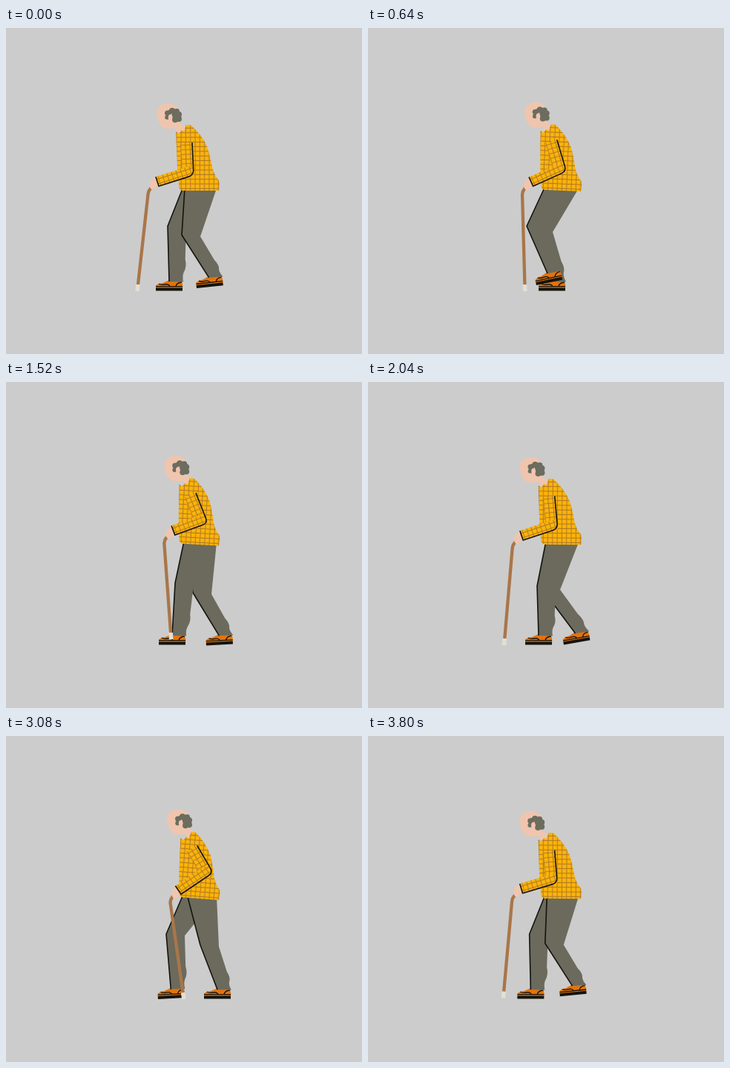
Recreate the animation shown at these times as an HTML page. Size 480 px wide and 441 px high, loop 3.84 s.

```html
<!DOCTYPE html>
<html lang="en">
<head>
<meta charset="utf-8">
<title>Walking with a cane</title>
<style>
  html, body { margin: 0; width: 100%; height: 100%; overflow: hidden; background: #ccc; }
  svg { display: block; }
  .line { fill: none; stroke: #14140f; stroke-width: 1.6; stroke-linejoin: round; }
  .skin { fill: #f0c5ae; }
  .hair { fill: #6c6c5f; }
  .trousers { fill: #6b6a5d; }
  .plaid { fill: url(#plaid); }
</style>
</head>
<body>
<svg width="480" height="441" viewBox="0 0 480 441">
  <defs>
    <pattern id="plaid" width="6.3" height="6.3" patternUnits="userSpaceOnUse">
      <rect width="6.3" height="6.3" fill="#fbb40a"/>
      <path d="M0 3H6.3M3 0V6.3" stroke="#b27a22" stroke-width="1"/>
    </pattern>
    <g id="shoe">
      <path fill="#e2730f" d="M0-3V-7Q2-10 9-10.5L17-14H34Q37-9 36-3Z"/>
      <path fill="#14140f" d="M0-4H36V0H0Z"/>
      <path class="line" style="stroke-width:1.3" d="M0-5.8H36M4-9.5Q7-7.5 12-8.5T19-6M27-6Q28-11 35-11.5"/>
    </g>
  </defs>

  <g id="far"><use href="#shoe"/><path class="trousers"/><path class="line"/></g>
  <g id="near"><use href="#shoe"/><path class="trousers"/><path class="line"/></g>

  <g id="head">
    <path class="skin" d="M203.500 116C203 107 210 102 218 102C228 102 234 108 234 118L233 128L241 134L238 142L230 140L228 135C222 137 213 137 210 133C206 128 204 123 203.500 116Z"/>
    <g class="hair">
      <path d="M216 113L223 109L234 113L235 125L226 126L223 115L219 124L215 121Z"/>
      <circle cx="217.500" cy="115" r="3.500"/><circle cx="217" cy="121" r="2.800"/>
      <circle cx="224" cy="112" r="4"/><circle cx="230" cy="113" r="4"/>
      <circle cx="233" cy="117" r="4"/><circle cx="233" cy="123" r="4"/><circle cx="228" cy="124" r="4"/>
    </g>
    <ellipse class="skin" cx="221.500" cy="121" rx="2.700" ry="4"/>
  </g>

  <path id="torso" class="plaid" d="M243 131Q249 130 252 134Q264 145 271 160Q275 172 278 188Q280 198 287 206Q289 210 287 220H238Q232 218 233 211L231 190L229 140L233 143L237 138L240 140Z"/>
  <path id="cane" fill="none" stroke="#a97649" stroke-width="4.300"/>
  <path id="tip" stroke="#e3dfd7" stroke-width="5.500"/>

  <rect id="upperArm" class="plaid" height="16"/>
  <g id="forearm">
    <path class="skin" d="M1-12Q-5-13-9-9Q-13-4-11 1Q-8 4-4 0L1-2Z"/>
    <rect class="plaid" y="-13.500" height="13.500"/>
  </g>
  <path id="armLine" class="line"/>
</svg>
<script>
const LOOP = 3840, STEP = LOOP / 2, FRAME = 40;
const $ = id => document.getElementById(id);
const set = (el, name, value) => el.setAttribute(name, value);

// time, toe x, sole y, foot angle, knee x, knee y
const nearKeys = [
  [0, 257, 352, -6, 237, 280],
  [640, 227, 348, -12, 214, 268],
  [1520, 206, 355.5, 0, 228, 272],
  [1680, 199, 355.5, 0, 224, 271],
  [2040, 212, 355.5, 0, 228, 276],
  [2600, 245, 355.5, 0, 240, 280],
  [3080, 267, 355.5, 0, 262, 283],
  [3400, 275, 355.5, -2, 258, 284],
];
const farKeys = [
  [0, 202, 355.5, 0, 218, 268],
  [640, 230, 355.5, 0, 224, 274],
  [1520, 270, 356.5, -3, 252, 285],
  [2040, 264, 355.5, -10, 234, 279],
  [2600, 231, 350, -20, 211, 262],
  [3080, 205, 356, -3, 216, 268],
  [3560, 199, 355.5, 0, 216, 268],
];

// Looping monotone cubic interpolation through the keys
function pose(keys, t) {
  const n = keys.length;
  const at = i => {
    const turn = Math.floor(i / n), [time, ...values] = keys[i - turn * n];
    return [time + turn * LOOP, ...values];
  };
  const i = keys.findLastIndex(k => k[0] <= t);
  const [a, b, c, d] = [-1, 0, 1, 2].map(k => at(i + k));
  const slope = (p, q, j) => (q[j] - p[j]) / (q[0] - p[0]);
  const tangent = (m, k) => m * k > 0 ? 2 * m * k / (m + k) : 0;
  const h = c[0] - b[0], u = (t - b[0]) / h, v = 1 - u;
  return [1, 2, 3, 4, 5].map(j => {
    const mid = slope(b, c, j);
    const m0 = tangent(slope(a, b, j), mid), m1 = tangent(mid, slope(c, d, j));
    return v * v * (1 + 2 * u) * b[j] + u * u * (3 - 2 * u) * c[j] + h * u * v * (v * m0 - u * m1);
  });
}

function drawLeg(id, keys, t) {
  const [x, y, angle, kx, ky] = pose(keys, t);
  const r = angle * Math.PI / 180;
  const onFoot = (px, py) => [x + px * Math.cos(r) - py * Math.sin(r), y + px * Math.sin(r) + py * Math.cos(r)];
  const ankle = onFoot(18, -12.5), heel = onFoot(37, -12);
  const back = [kx + 25, ky + 2];
  const shin = (u, out) => [back[0] + (heel[0] - back[0]) * u + out, back[1] + (heel[1] - back[1]) * u];
  const front = `M${241 + (kx - 237) * .15} 217L${kx} ${ky}L${ankle}`;
  const [shoe, cloth, line] = $(id).children;
  set(shoe, 'transform', `translate(${x} ${y}) rotate(${angle})`);
  set(cloth, 'd', `${front}L${heel}Q${shin(.9, -2)} ${shin(.82, 0)}Q${shin(.72, 4)} ${shin(.58, 1)}L${back}L284 217Z`);
  set(line, 'd', front);
}

const toward = (p, q, dist) => {
  const k = dist / Math.hypot(q[0] - p[0], q[1] - p[1]);
  return [p[0] + (q[0] - p[0]) * k, p[1] + (q[1] - p[1]) * k];
};

function placeLimb(el, box, from, to) {
  const dx = to[0] - from[0], dy = to[1] - from[1];
  set(el, 'transform', `translate(${from}) rotate(${Math.atan2(dy, dx) * 180 / Math.PI})`);
  set(box, 'width', Math.hypot(dx, dy));
}

function drawUpperBody(t) {
  // The cane stays planted until PLANT, then is lifted and swung forward
  const PLANT = 1200, p = t % STEP;
  const swing = Math.max(0, (p - PLANT) / (STEP - PLANT));
  const sway = swing ? 1 - swing ** 1.5 : p / PLANT;
  const lift = Math.sin(Math.PI * swing);

  set($('torso'), 'transform', `rotate(${4.6 * sway} 262 219)`);
  set($('head'), 'transform', `translate(${14.5 * sway} ${-3 * sway})`);

  const shoulder = [251 + 7 * sway, 155 - 7 * sway];
  const elbow = [253 + 27 * sway, 199 - 4 * sway - 11 * sway * sway];
  const wrist = [206 + 31 * sway, 214 - 7 * lift];
  placeLimb($('upperArm'), $('upperArm'), shoulder, elbow);
  placeLimb($('forearm'), $('forearm').lastElementChild, wrist, elbow);

  const [wx, wy] = wrist, [ux, uy] = toward([0, 0], [elbow[0] - wx, elbow[1] - wy], 13.5);
  set($('armLine'), 'd', `M${shoulder}L${toward(elbow, shoulder, 7)}Q${elbow} ${toward(elbow, wrist, 7)}L${wrist}L${wx + uy} ${wy - ux}`);

  const bend = [wx - 14.5, wy + 11], end = [177 + 65 * sway, 356 - 8 * lift];
  const ferrule = toward(end, bend, 9);
  set($('cane'), 'd', `M${wx - 6} ${wy + 1}Q${wx - 13.5} ${wy + 2} ${bend}L${ferrule}`);
  set($('tip'), 'd', `M${ferrule}L${end}`);
}

function draw(now) {
  const t = Math.floor(now % LOOP / FRAME) * FRAME;
  drawLeg('far', farKeys, t);
  drawLeg('near', nearKeys, t);
  drawUpperBody(t);
  requestAnimationFrame(() => draw(performance.now() - start));
}
const start = performance.now();
draw(0);
</script>
</body>
</html>
```
